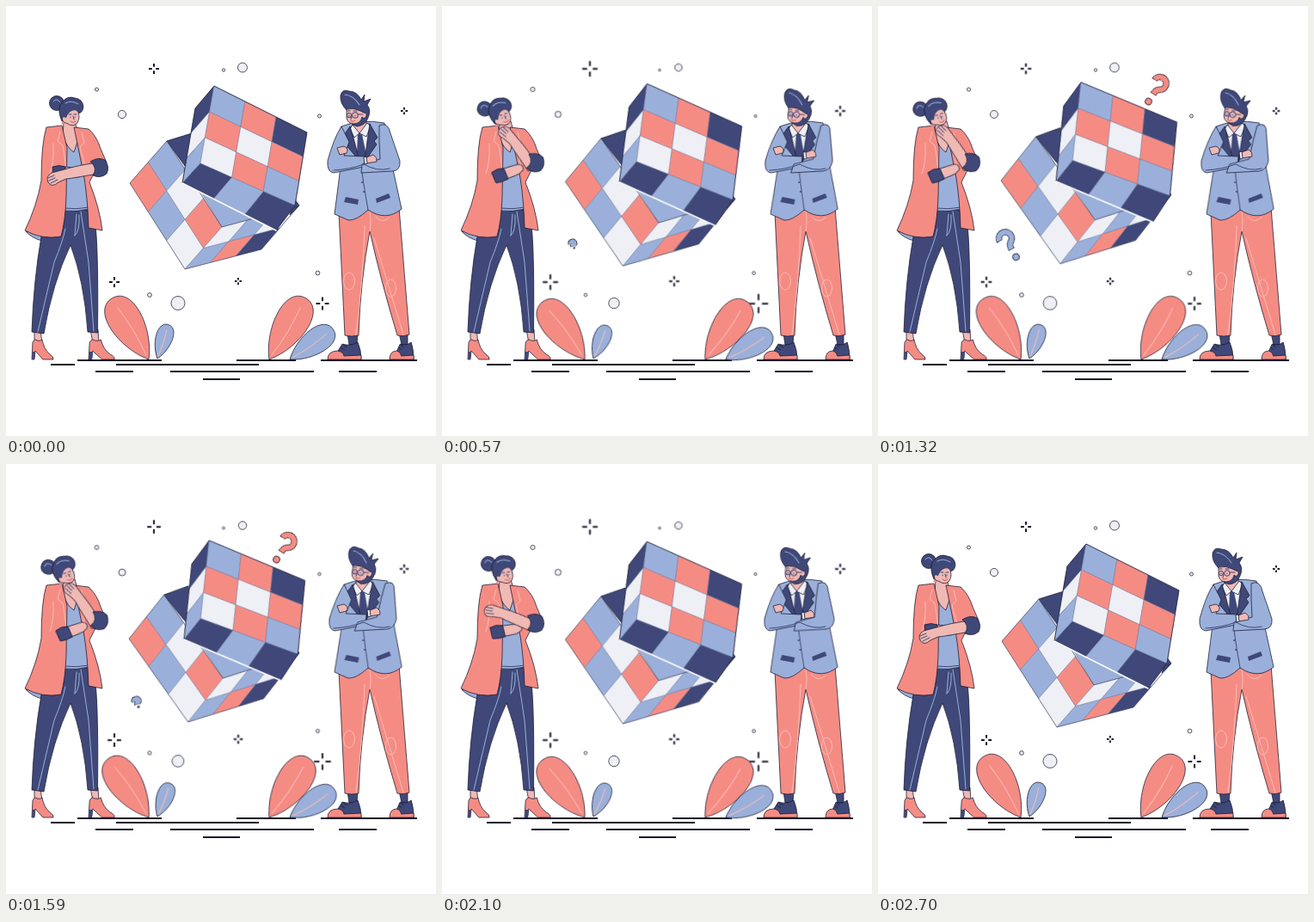
These frames come from a looping animation (500 px wide and 500 px high, 2760 ms). An HTML page:

```html
<!DOCTYPE html>
<html lang="en">
<head>
<meta charset="utf-8">
<title>Puzzle cube</title>
<style>
html,body{margin:0;width:100%;height:100%;overflow:hidden;background:#fff}
svg{display:block;width:100%;height:100%}
path,circle,ellipse{stroke:#17182f;stroke-width:.75;stroke-linejoin:round;vector-effect:non-scaling-stroke}
.n{fill:#3f4878}.c{fill:#f58c84}.b{fill:#9ab0da}.s{fill:#f0b9b4}.w{fill:#eef0f5}
.x{stroke:none}
.pale,.sky,.dark,.red{fill:none;stroke:#f9bbb5;stroke-width:1;stroke-linecap:round}
.sky{stroke:#9ab0da}.dark{stroke:#3f4878}.red{stroke:#d9504e}
.cell{stroke:#59618c;stroke-width:.4}
.floor,.star{fill:none;stroke:#15162b;stroke-width:2}
.floor{shape-rendering:crispEdges}
.rim{fill:none}
.seam{stroke:#fff;stroke-width:1.6}
.glyph{fill:none;stroke-width:7.4}
.ink{stroke-width:6}

.turn,.pose,.pulse,.ask{animation:turn 2760ms cubic-bezier(.35,.45,.6,1) infinite}
.pose{animation-name:pose;animation-timing-function:ease-in-out}
.pulse{animation-name:pulse;animation-timing-function:cubic-bezier(.3,.6,.55,1)}
.ask{animation-name:ask;animation-timing-function:linear;animation-fill-mode:backwards}
.late{animation-delay:250ms}
.dot{transform-box:fill-box;transform-origin:center}
@keyframes turn{
  0%,98%,100%{transform:none}
  49%{transform:var(--t);animation-timing-function:cubic-bezier(.4,0,.65,.55)}
}
@keyframes pose{
  0%,88%,100%{transform:none}
  24%,64%{transform:var(--t)}
}
@keyframes pulse{
  0%,49%,98%,100%{transform:none}
  24.5%,73.5%{transform:var(--t);animation-timing-function:cubic-bezier(.45,0,.7,.4)}
}
@keyframes ask{
  0%,18%,60%,100%{transform:rotate(15deg) scale(0)}
  30%,52%{transform:none}
}
</style>
</head>
<body>
<svg viewBox="0 0 500 500">
<defs>
  <path id="heel" d="M0 0L1 -20Q4 -25 6 -22Q10 -21 12 -23Q14 -12 21 -6Q26 -3 25 0H13L4 -10L3 0Z"/>
  <g id="sneaker">
    <path class="n" d="M12 -10L17 -18Q26 -15 35 -20Q39 -11 39 0H12Z"/>
    <path class="c" d="M0 0Q0 -10 12 -10Q18 -9 19 -4L39 -5V0Z"/>
    <path class="w" d="M15 -14l5 3m-2 -6l5 3"/>
  </g>
  <path id="hook" d="M-7.5 -9A7.5 7.5 0 1 1 3 -2Q0 0 0 6"/>
</defs>

<g id="air"></g>
<path class="floor" d="M83 412H181M268 412H337M366 412H478M52 417H80M128 417H294M104 425H148M191 425H358M387 425H431M229 434H272"/>
<g id="leaves"></g>
<g id="body" class="turn" style="--t:translate(-1px,-3px) rotate(-2.8deg);transform-origin:144px 206px"></g>
<g id="slab" class="turn" style="--t:translate(2px,-2px) rotate(-4deg);transform-origin:205px 206px"></g>

<g transform="translate(152.5 278) rotate(-30)"><g class="ask">
  <use href="#hook" class="glyph"/><path class="glyph" d="M-7.5 -9A7.5 7.5 0 1 1 3 -2Q0 0 0 6"/>
  <path class="glyph ink" style="stroke:#9ab0da" d="M-7.5 -9.5A7.5 7.5 0 1 1 3 -2Q0 0 0 5.5"/>
  <circle class="b" cy="16" r="4"/>
</g></g>
<g transform="translate(323 97.5) rotate(32)"><g class="ask late">
  <path class="glyph" d="M-7.5 -9A7.5 7.5 0 1 1 3 -2Q0 0 0 6"/>
  <path class="glyph ink" style="stroke:#f58c84" d="M-7.5 -9.5A7.5 7.5 0 1 1 3 -2Q0 0 0 5.5"/>
  <circle class="c" cy="16" r="4"/>
</g></g>

<!-- woman -->
<g>
  <path class="s" d="M33 376V392H42L40 376ZM98 376L101 392H108L107 376Z"/>
  <use href="#heel" class="c" transform="translate(30 411)"/>
  <use href="#heel" class="c" transform="translate(96 411) scale(1.2 1)"/>
  <path class="n x" d="M30 411L31 402H34L33 411ZM96 411L97 402H101L100 411Z"/>
  <path class="b" d="M23 262Q30 270 42 273L62 266Z"/>
  <path class="n" d="M67 237H101Q108 258 106.500 380L95 379Q91 320 75 278Q54 322 44 381L30 379Q32 320 41 268Z"/>
  <path class="sky" d="M69 259Q66 274 56 298L37 379M87 239L96 298L102 378M80 267Q86 262 85 243M80 267L82 242"/>
  <path class="b" d="M66 150H94L97 236Q82 240 66 238Z"/>
  <path class="dark" d="M67 235Q82 237 97 234"/>
  <path class="s" d="M67 134L66 152Q72 166 79 170L85 152L80 134Z"/>
  <path class="c" d="M47 141Q41 160 41 203Q36 232 22 261Q42 272 64 268Q69 250 70 222L71 165L65 139Z"/>
  <path class="c" d="M79 141L96 143Q106 152 110 166L117 182L104 191L97 205Q109 235 112 261L96 258Q95 225 91 200L85 170Z"/>
  <path class="pale" d="M63 146L60 157L66 162Q69 178 70 193M88 147L91 159L86 164L92 187M55 160Q56 182 51 195"/>

  <g class="pose" style="--t:translate(5px,4px) rotate(-20deg);transform-origin:62px 192px">
    <path class="s" d="M66 187L86 188Q92 190 90 196L84 199L66 200Z"/>
    <path class="n" d="M54 187Q62 184 69 187L70 200Q62 202 55 200Z"/>
  </g>

  <g class="pose" style="--t:translate(-3px,1px) rotate(-19deg);transform-origin:73px 136px">
    <circle class="n" cx="59" cy="113" r="8.500"/>
    <path class="n" d="M65 134Q58 118 66 111Q72 104 80 107Q89 108 90 117Q89 127 80 124L70 134Z"/>
    <path class="s" d="M69 126Q73 119 83 121Q87 129 83 136Q78 141 72 137L67 135Q63 130 69 126Z"/>
    <path class="n x" d="M66 129Q66 116 77 117Q90 112 89 120Q85 126 81 121Q73 121 70 130Z"/>
    <path class="sky" d="M69 113Q76 109 84 114M55 111Q59 106 63 112"/>
    <path class="dark" d="M73 126h3m3 0h3M75 129v.8m5 -.8v.8M78 128l1 4"/>
    <path class="red" d="M75 134Q78 137 81 134"/>
    <circle class="c x" cx="66" cy="136" r="1.600"/>
  </g>

  <g class="pose" style="--t:rotate(68deg);transform-origin:106px 188px">
    <path class="s" d="M107 182Q84 185 68 190L53 194Q46 198 49 205Q53 212 61 205Q69 200 78 200L107 195Z"/>
    <path class="dark" d="M49 200l7 -3m-6 6l7 -3m-5 6l8 -4"/>
  </g>
  <path class="n pose" style="--t:translate(0,-6px) rotate(20deg);transform-origin:108px 188px"
    d="M98 181Q107 175 115 179Q121 187 117 195Q110 201 101 197Q107 188 98 181Z"/>
</g>

<!-- man -->
<g>
  <path class="n" d="M397 381L399 394H408L409 381ZM457 380L460 394H467V380Z"/>
  <use href="#sneaker" transform="translate(374 411)"/>
  <use href="#sneaker" transform="translate(446 411) scale(.72 1)"/>
  <path class="c" d="M387 240L457 234L469 382Q462 385 455 383Q436 320 423 262Q412 320 410 383Q402 385 394 383Z"/>
  <ellipse class="pale" cx="399" cy="320" rx="6.500" ry="10"/>
  <ellipse class="pale" cx="447.500" cy="328" rx="6" ry="10"/>
  <path class="pale" d="M423 262Q425 249 423 239M417 256Q415 320 407 382M428 270L462 382M430 245Q437 254 446 246"/>
  <g class="pose" style="--t:skewX(-1.8deg);transform-origin:420px 243px">
    <path class="b" d="M390 140Q412 131 440 136L450 190L460 236Q442 251 421 237Q407 250 398 249L382 242L388 195Z"/>
    <path class="dark" d="M414 194Q417 215 421 237"/>
    <path class="n x" d="M395 222l15 3l-1 6l-16 -3ZM430 224l15 -6l2 5l-16 6Z"/>
    <circle class="n x" cx="414" cy="205" r="1"/><circle class="n x" cx="416" cy="216" r="1"/>
    <path class="w" d="M401 140L423 137L424 156L415 182L406 166Z"/>
    <path class="s" d="M404 133L418 131L420 141L411 149L404 143Z"/>
    <path class="w" d="M403 138L411 148L405 153L400 143ZM420 136L411 148L419 152L424 140Z"/>
    <path class="n x" d="M409 149H414L419 173L413 181L408 171Z"/>
    <path class="n" d="M400 140L393 150L396 156L394 160L411 180L405 157ZM423 137L432 153L428 157L431 161L417 181L420 157Z"/>
    <path class="b" d="M390 140Q381 154 374 180Q373 193 381 194L416 187L417 175L393 174L399 158Z"/>
  </g>
  <g class="pose" style="--t:skewX(-15deg);transform-origin:430px 165px">
    <path class="b" d="M434 139Q444 134 447 148L458 180Q459 191 450 192L413 194L414 184L435 178L434 157Z"/>
  </g>
  <path class="dark" d="M381 191Q400 190 416 184Q432 193 446 189"/>
  <g class="pose" style="--t:translate(4px,-6px)">
    <path class="s" d="M419 176L427 173Q432 176 431 181L419 183Z"/>
    <path class="w" d="M416 176L419 175L420 183L417 184Z"/>
  </g>
  <g transform="translate(390 168)">
    <path class="s" transform="scale(.01)" style="display:none" d="M0 0"/>
    <path class="s pose" style="transform:scale(0);--t:scale(1)" d="M-5 -3L3 -5Q9 -2 6 3L-2 5Z"/>
  </g>

  <g class="pose" style="--t:translate(4px,0) rotate(8deg);transform-origin:412px 145px">
    <path class="n" d="M396 121Q388 113 389 104Q391 96 399 99Q408 99 413 109L417 103L416 111L424 108L420 115Q425 121 421 130Q418 139 408 140L402 137Z"/>
    <path class="s" d="M396 120Q405 118 412 122L416 124Q421 124 418 130Q415 131 414 129Q413 136 405 137Q397 137 396 130Z"/>
    <circle class="dark" cx="406" cy="127" r="3.300"/><circle class="dark" cx="399" cy="127" r="2.600"/>
    <path class="dark" d="M409.500 126H415M406 127v.7m-7 -.7v.7M402 128l-1 4M397 122h3m4 0h4"/>
    <path class="red" d="M401 133.500Q404 135 406 133"/>
    <path class="sky" d="M394 103Q404 104 411 115"/>
  </g>
</g>
</svg>
<script>
const add = (id, tag, attrs) => {
  const el = document.createElementNS('http://www.w3.org/2000/svg', tag);
  for (const k in attrs) el.setAttribute(k, attrs[k]);
  document.getElementById(id).append(el);
  return el;
};
const mix = (p, q, k) => p.map((v, i) => v + (q[i] - v) * k);
const poly = (id, cls, ...pts) => add(id, 'path', { class: cls, d: `M${pts.join('L')}Z` });

// a, b: ends of the first row; d, c: ends of the last
function face(id, [a, b, c, d], cols, colours) {
  const rows = colours.length / cols;
  const at = (u, v) => mix(mix(a, b, u / cols), mix(d, c, u / cols), v / rows);
  [...colours].forEach((colour, i) => {
    const u = i % cols, v = Math.floor(i / cols);
    poly(id, 'cell ' + colour, at(u, v), at(u + 1, v), at(u + 1, v + 1), at(u, v + 1));
  });
}

// two lower layers
const west = [144, 206], north = [187, 157], south = [208, 306];
const mid = [251, 257], east = [340, 233], base = [297, 283];
poly('body', 'n', north, [216, 148], [220, 200], [208, 186]);
poly('body', 'cell b', [220, 205], mid, [300, 245]);
face('body', [west, north, mid, south], 2, 'cbbwwc');
face('body', [south, base, east, mid], 3, 'bcnwbw');
poly('body', 'n', [336, 225], [341, 232], [330, 243]);
poly('body', 'rim', west, north, mid, east, base, south).style.strokeWidth = .4;

// turned top layer
const top1 = [242, 93], top2 = [350, 147], left = [220, 119];
const front1 = [226, 183], front2 = [336, 232], low1 = [205, 206], low2 = [314, 261];
face('slab', [top1, left, low1, front1], 1, 'nwb');
face('slab', [top1, top2, front2, front1], 3, 'bcncwcwcb');
face('slab', [front1, front2, low2, low1], 3, 'nbn');
poly('slab', 'rim', top1, top2, front2, low2, low1, left);
poly('slab', 'seam', low1, low2);

function leaf(colour, x, y, angle, size) {
  add('leaves', 'g', { id: 'leaf' + x, transform: `translate(${x} ${y})` });
  const g = add('leaf' + x, 'g', { class: 'pulse', style: `--t:rotate(${5 * Math.sign(angle)}deg)` });
  g.id = 'blade' + x;
  const pose = `rotate(${angle}) scale(${size})`;
  add(g.id, 'path', { class: colour, transform: pose, d: 'M0 0C-24 -30 -28 -83 0 -83S24 -30 0 0Z' });
  add(g.id, 'path', { class: 'pale', transform: pose, d: 'M0 -6Q4 -40 0 -70' });
}
leaf('c', 166, 411, -31, 1);
leaf('b', 176, 410, 18, .5);
leaf('c', 306, 411, 31, 1);
leaf('b', 330, 411, 55, .74);

function bubble(cx, cy, r, size = .77) {
  add('air', 'circle', { class: 'w pulse dot', cx, cy, r, style: `--t:scale(${size})` });
}
bubble(275, 71.5, 5.5);
bubble(253, 74.5, 1.7);
bubble(105.5, 97, 2, 1.3);
bubble(135, 126, 4.6);
bubble(364.5, 128, 2);
bubble(167, 336, 2.4);
bubble(200, 345.5, 8);
bubble(362.5, 310.5, 2.4);

function star(x, y, r) {
  const arm = r * .64, gap = r * .72;
  add('air', 'path', {
    class: 'star pulse dot', style: '--t:scale(1.5)',
    d: `M${x - r} ${y}h${arm}m${gap} 0h${arm}M${x} ${y - r}v${arm}m0 ${gap}v${arm}`
  });
}
star(172, 73, 6);
star(463, 122, 4);
star(126, 321, 6);
star(270, 320, 4);
star(368, 346, 7.5);
</script>
</body>
</html>
```
